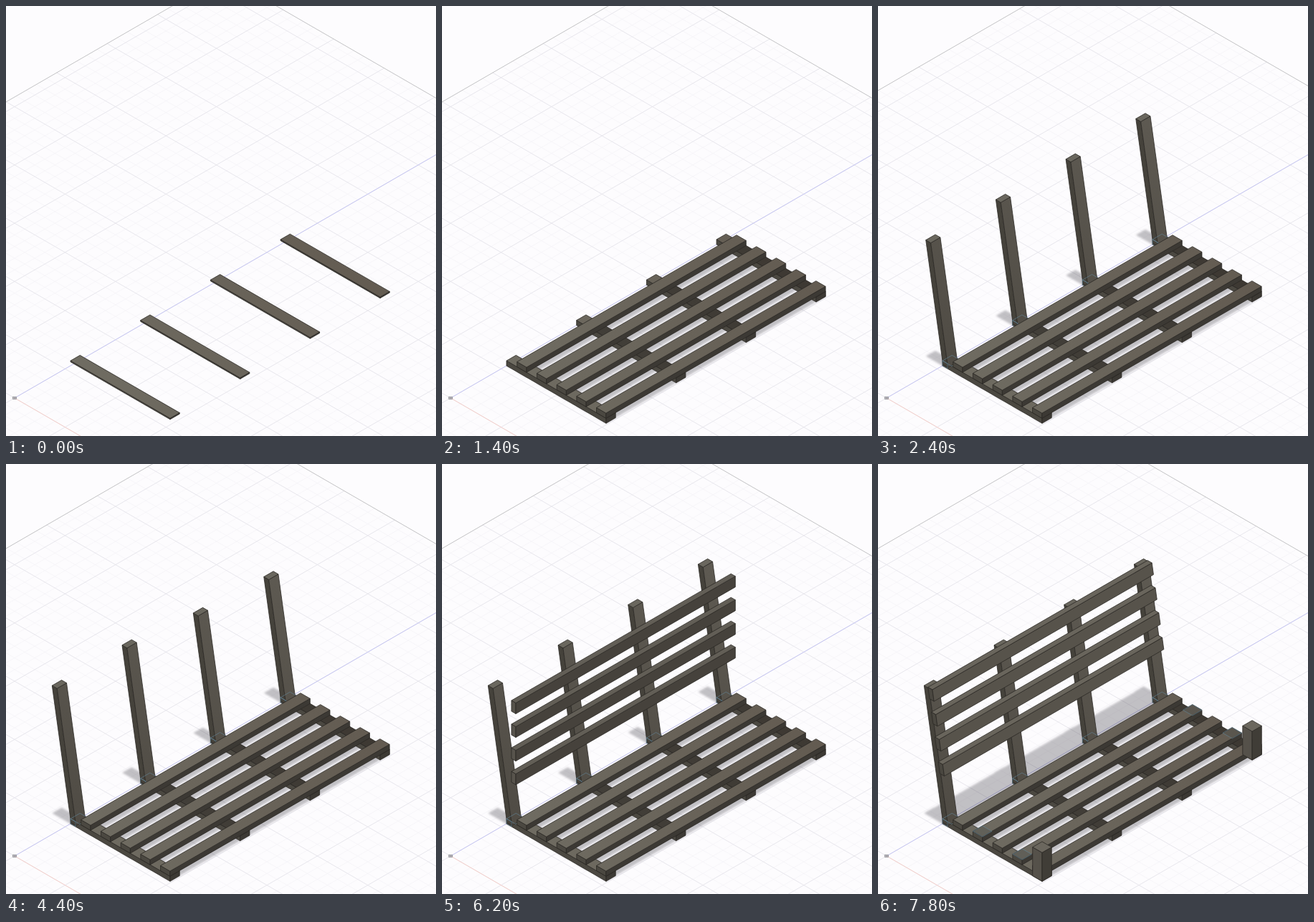
An HTML page with a canvas that plays this animation: 600x600 px, repeating every 8000 ms.

```html
<!DOCTYPE html>
<html lang="en">
<head>
<meta charset="utf-8">
<title>Bench assembly</title>
<style>
  html, body { margin: 0; width: 100%; height: 100%; overflow: hidden; background: #fdfcfe; }
  canvas { display: block; width: 600px; height: 600px; }
</style>
</head>
<body>
<canvas id="stage" width="600" height="600"></canvas>
<script>
const ctx = document.getElementById('stage').getContext('2d');
const LOOP = 8000, STEP = 200;
const COS = Math.sqrt(3) / 2;
const LENGTH = 353.7, WIDTH = 15.3, DEPTH = 160.5, THICK = 7, GAP = 112.8;
const FLOOR = -7, LEAN = 0.173;
const BEAMS = [0, 1, 2, 3].map(i => i * GAP);
const SLATS = [17, 49, 81, 113, 145];
const GRID = 81.3, ORIGIN = [12, 547];
const EDGE = '#2b2925', SKETCH = 'rgba(100,135,155,.75)';

// Isometric view: u runs up-right, v down-right, z up.
const iso = ([u, v, z]) => [90 + (u + v) * COS, 495 + (v - u) / 2 - z];
const add = (...ps) => ps.reduce((a, b) => a.map((n, i) => n + b[i]));

function gradient(x0, y0, x1, y1, from, to) {
  const g = ctx.createLinearGradient(x0, y0, x1, y1);
  g.addColorStop(0, from);
  g.addColorStop(1, to);
  return g;
}

const WOOD = {
  top: gradient(90, 540, 536, 340, '#706d63', '#625a50'),
  left: '#4b4841',
  right: '#3c3934'
};
const POST = { top: '#6a675e', left: '#45423b', right: gradient(0, 140, 0, 490, '#5e5a52', '#504c45') };
const LOOSE = { top: '#625e56', left: '#57534c', right: '#46423c' };
const FIXED = { top: '#69655c', left: '#4a4740', right: '#57534b' };
const CORNER = { top: '#6b675e', left: '#55514a', right: '#403d37' };

function trace(points) {
  points.forEach((p, i) => ctx[i ? 'lineTo' : 'moveTo'](...iso(p)));
  ctx.closePath();
}

function face(points, fill, stroke = EDGE) {
  ctx.beginPath();
  trace(points);
  if (fill) { ctx.fillStyle = fill; ctx.fill(); }
  if (stroke) { ctx.strokeStyle = stroke; ctx.lineWidth = 0.8; ctx.stroke(); }
}

// o: lower back corner, c: vector from bottom to top
function prism(o, du, dv, c, color) {
  const a = [du, 0, 0], b = [0, dv, 0];
  face([o, add(o, b), add(o, b, c), add(o, c)], color.left);
  face([add(o, b), add(o, a, b), add(o, a, b, c), add(o, b, c)], color.right);
  face([add(o, c), add(o, a, c), add(o, a, b, c), add(o, b, c)], color.top);
}

const box = (u, v, z, du, dv, dz, color) => prism([u, v, z], du, dv, [0, 0, dz], color);
const flat = (u, v, z, du, dv) => [[u, v, z], [u + du, v, z], [u + du, v + dv, z], [u, v + dv, z]];

// Linear ramp between two times, held outside them
const ramp = (t, t0, t1, from, to) =>
  from + (to - from) * Math.min(1, Math.max(0, (t - t0) / (t1 - t0)));

function pose(t) {
  const stretch = [[2800, 3600], [3600, 4200], [4200, 4800], [4800, 5400]];
  return {
    beam: ramp(t, 0, 800, 1.6, THICK),
    slat: ramp(t, 800, 1400, 0, THICK),
    posts: stretch.map(([a, b]) => ramp(t, 1400, 2400, 0, 155) + ramp(t, a, b, 0, 16)),
    board: ramp(t, 5400, 6200, 0, THICK),
    fixed: t >= 6400,
    shade: t >= 7000,
    corner: ramp(t, 7200, 7800, 0, 26),
    vEdge: t < 2000 ? -420 : -436,
    uEdge: t >= 2000 && t < 5600 ? 775 : 758
  };
}

function ground(p) {
  const at = (u, v) => [ORIGIN[0] + (u + v) * COS, ORIGIN[1] + (v - u) / 2];
  const line = (u0, v0, u1, v1, color, w) => {
    ctx.strokeStyle = color;
    ctx.lineWidth = w;
    ctx.beginPath();
    ctx.moveTo(...at(u0, v0));
    ctx.lineTo(...at(u1, v1));
    ctx.stroke();
  };
  const far = 800;
  for (const pass of [0, 1]) {
    for (let i = -50; i <= 50; i++) {
      const major = i % 5 === 0;
      if (major !== !!pass) continue;
      const k = i * GRID / 5, color = major ? '#e5e4ea' : '#f4f3f6', w = major ? 0.9 : 0.7;
      if (k < p.uEdge) line(k, p.vEdge, k, far, color, w);
      if (k > p.vEdge) line(-far, k, p.uEdge, k, color, w);
    }
  }
  line(-far, p.vEdge, p.uEdge, p.vEdge, '#bdbdbf', 0.9);
  line(p.uEdge, p.vEdge, p.uEdge, far, '#bdbdbf', 0.9);
  line(0, 0, p.uEdge, 0, '#c6c6f3', 1);
  line(0, 0, 0, far, '#f5cfca', 1);
  ctx.strokeStyle = '#8b8b8f';
  ctx.lineWidth = 0.8;
  ctx.strokeRect(9.5, 545.5, 5, 3);
  ctx.strokeRect(11, 546, 2, 2);
}

function shadows(p) {
  const cast = (u, v, du, dv) => trace(flat(u, v, FLOOR, du, dv));
  ctx.save();
  ctx.filter = 'blur(1.8px)';
  ctx.fillStyle = 'rgba(70,66,76,.32)';
  ctx.beginPath();
  if (p.slat > 0) {
    SLATS.forEach(v => cast(0, v, LENGTH, WIDTH));
    BEAMS.forEach((u, i) => {
      const reach = p.posts[i] * LEAN;
      cast(u, -reach, WIDTH, reach + 8);
    });
  }
  if (p.shade) cast(0, -29, LENGTH, 34);
  ctx.fill();
  ctx.restore();
}

function boards(p) {
  for (let i = 0; i < 4; i++) {
    if (p.fixed) {
      const z = 172 - 32 * i - 15, v = -23.3 + LEAN * (32 * i + 15);
      prism([0, v, z], LENGTH, THICK, [0, -LEAN * 15, 15], FIXED);
    } else {
      box(0, 8, 154 - 33 * i, LENGTH, p.board, 15, LOOSE);
    }
  }
}

function draw(t) {
  const p = pose(t);
  ctx.fillStyle = '#fdfcfe';
  ctx.fillRect(0, 0, 600, 600);
  ground(p);
  shadows(p);

  [...BEAMS].reverse().forEach(u => {
    box(u, 0, -p.beam, WIDTH, DEPTH, p.beam, WOOD);
    if (p.slat > 0 && u > 0) face(flat(u, 32, 0, WIDTH, DEPTH - 32), 'rgba(25,23,20,.5)', null);
  });

  if (p.posts[0] > 0) {
    for (let i = 3; i >= 0; i--) {
      const u = BEAMS[i], h = p.posts[i];
      prism([u, 0.8, -5], WIDTH, 8, [0, -LEAN * (h + 5), h + 5], POST);
      face(flat(u, 0, 0, WIDTH, 15), null, SKETCH);
      face([[u, 0, FLOOR], [u, 8, FLOOR], [u, 8, 0], [u, 0, 0]], null, SKETCH);
    }
  }
  if (p.board > 0) boards(p);
  if (p.slat > 0) SLATS.forEach(v => box(0, v, 0, LENGTH, WIDTH, p.slat, WOOD));

  if (p.corner > 0) {
    const end = LENGTH - WIDTH;
    [end, 0].forEach(u => {
      [49, 113].forEach(v => face(flat(u, v, THICK, WIDTH, WIDTH), 'rgba(60,66,66,.25)', SKETCH));
      box(u, DEPTH - WIDTH, FLOOR, WIDTH, WIDTH, THICK * 2 + p.corner, CORNER);
    });
  }
}

let last = -1;
function tick(now) {
  const step = Math.floor((now % LOOP) / STEP);
  if (step !== last) draw((last = step) * STEP);
  requestAnimationFrame(tick);
}
draw(0);
requestAnimationFrame(tick);
</script>
</body>
</html>
```
